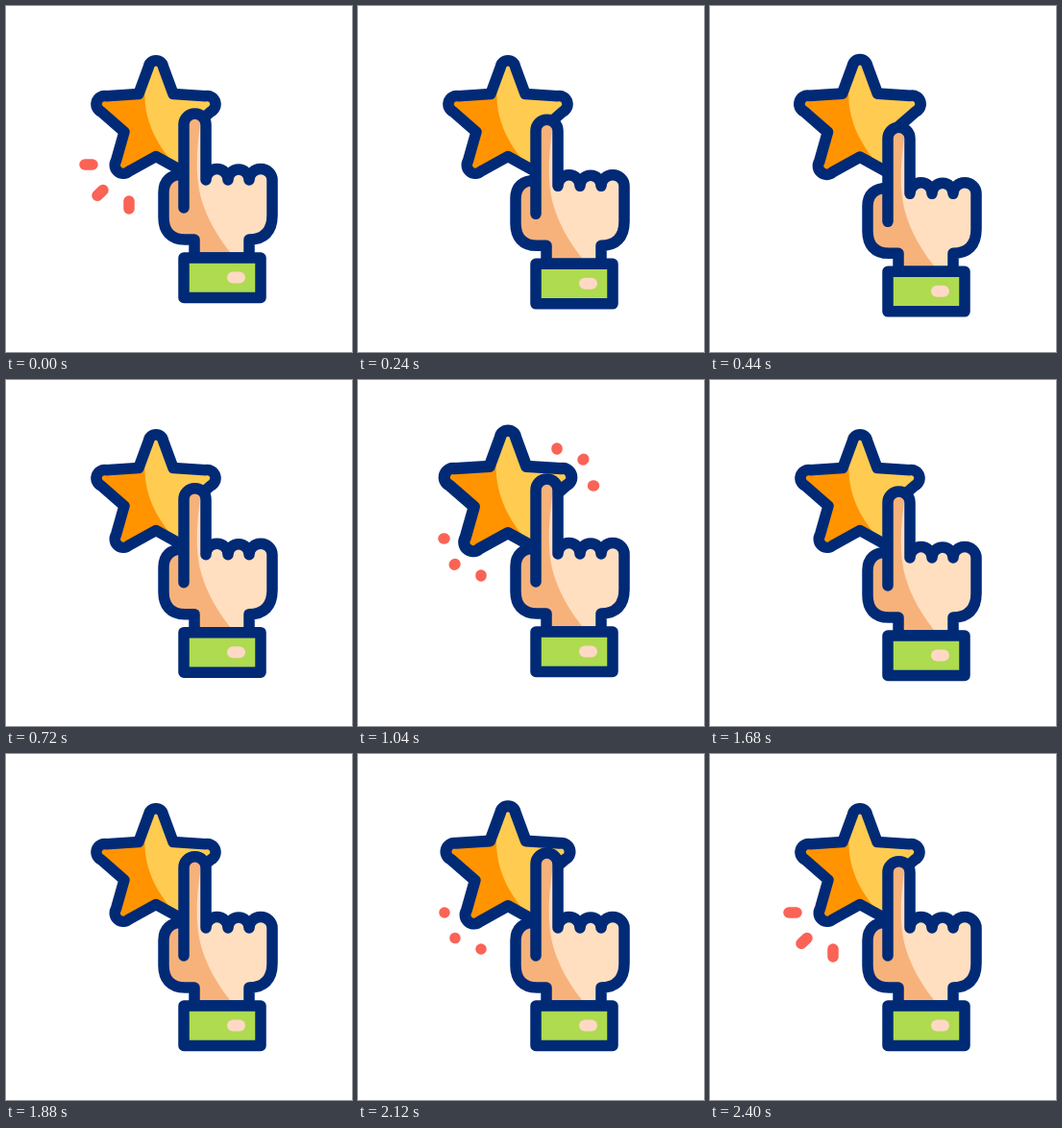
An HTML page that plays this animation: 360 by 360 pixels, repeating every 2440 ms.

```html
<!DOCTYPE html>
<html lang="en">
<head>
<meta charset="utf-8">
<title>Tap the star</title>
<style>
  html, body { margin: 0; width: 100%; height: 100%; overflow: hidden; background: #fff; }
  svg { display: block; width: 100%; height: 100%; }
  .ink { fill: none; stroke: #002a76; stroke-width: 11.5; stroke-linecap: round; stroke-linejoin: round; }
</style>
</head>
<body>
<svg viewBox="0 0 360 360">
  <defs>
    <path id="starShape" d="M148.500 63A7.600 7.600 0 0 1 163.500 63L174 91.500L208 93.700A8.600 8.600 0 0 1 213 110L189 131L197.500 161A8.800 8.800 0 0 1 184 172L156 156.500L128 172A8.800 8.800 0 0 1 114.500 161L123 131L99 110A8.600 8.600 0 0 1 104 93.700L138 91.500Z"/>
    <clipPath id="starClip"><use href="#starShape"/></clipPath>
    <clipPath id="handClip"><path class="hand"/></clipPath>
  </defs>
  <g id="star">
    <use href="#starShape" fill="#ff9300"/>
    <path clip-path="url(#starClip)" fill="#ffcb50" d="M151.500 52C138 92 141 132 184 174L235 185V45Z"/>
    <use href="#starShape" class="ink"/>
  </g>
  <g id="sparks" stroke-linecap="round"></g>
  <g id="arm">
    <path class="hand" fill="#f7b27b"/>
    <path clip-path="url(#handClip)" fill="#ffdfc0" d="M206 100C198 140 196 175 203 200C209 221 220 240 236 260V264H290V100Z"/>
    <path class="hand ink"/>
    <rect x="185" y="262" width="80" height="41.500" fill="#aedb4f"/>
    <rect x="185" y="262" width="80" height="41.500" class="ink"/>
    <rect x="230" y="276.500" width="19" height="12" rx="6" fill="#ffd8c6"/>
  </g>
</svg>
<script>
const LOOP = 2440;
const RED = '#fa6355', GOLD = '#ffb84f';
const $ = id => document.getElementById(id);
const hands = document.querySelectorAll('.hand');

const ease = u => (1 - Math.cos(Math.PI * u)) / 2;

// keys: [time, value] pairs, eased between neighbours
function track(keys, t) {
  if (t <= keys[0][0]) return keys[0][1];
  for (let i = 1; i < keys.length; i++) {
    const [t0, a] = keys[i - 1], [t1, b] = keys[i];
    if (t <= t1) return a + (b - a) * ease((t - t0) / (t1 - t0));
  }
  return keys[keys.length - 1][1];
}

const DROP = [[40, 0], [480, 14.6], [760, 0], [1120, 0], [1460, 14.6], [1500, 14.6], [1780, 0]];
const REACH = [[740, 0], [940, 9], [1060, 9], [1160, 0], [1760, 0], [1980, 9], [2120, 9], [2440, 0]];
const PULSES = [520, 1040, 1557, 2068];

// spark motion, in ms since it appears
const HEAD = [[60, 0], [330, 8]];
const TAIL = [[380, 0], [480, 7]];
const SIZE = [[0, 0], [50, 11.5], [440, 11.5], [520, 0]];
const BURSTS = [{ at: 920, both: true }, { at: 2060, both: false }];

// start point and direction
const SPARKS = [
  [90, 165, -1, 0], [101, 191.5, -0.75, 0.72], [128, 203, 0, 1],
  [207, 72, 0, -1], [234, 83, 0.75, -0.72], [244.5, 110, 1, 0]
].map(([x, y, dx, dy], i) => {
  const lines = [0, 1].map(() => {
    const line = document.createElementNS('http://www.w3.org/2000/svg', 'path');
    $('sparks').append(line);
    return line;
  });
  return { x, y, dx, dy, lines, right: i > 2 };
});

function handPath(reach) {
  return `M185 210V${123.5 - reach}a11.5 11.5 0 0 1 23 0V181` +
    'a11.5 11.5 0 0 1 23 0a11 11 0 0 1 22 0a12 11.5 0 0 1 24 0' +
    'V218C277 235 268 243 253 243V262H196V243H186' +
    'C171 243 164 234 164 220V194C164 182 171 175 185 175';
}

function drawSpark(s, t) {
  let age = -1;
  for (const b of BURSTS) {
    const a = (t - b.at + LOOP) % LOOP;
    if (a < 520 && (b.both || !s.right)) age = a;
  }
  const size = age < 0 ? 0 : track(SIZE, age);
  const head = track(HEAD, age), tail = track(TAIL, age);
  const point = d => `${s.x + s.dx * d} ${s.y + s.dy * d}`;
  const d = `M${point(tail)}L${point(head + 0.01)}`;
  const gold = age > 400;
  s.lines.forEach((line, i) => {
    line.setAttribute('d', d);
    line.setAttribute('stroke', i ? GOLD : RED);
    line.setAttribute('stroke-width', i ? Math.max(0, size - 1) : size);
    line.style.display = size > 0.1 && (!i || gold) ? '' : 'none';
  });
}

function draw(t) {
  const d = handPath(track(REACH, t));
  hands.forEach(h => h.setAttribute('d', d));
  $('arm').setAttribute('transform', `translate(0 ${track(DROP, t)})`);

  let pulse = 0;
  for (const p of PULSES) {
    const u = Math.abs(t - p) / 120;
    if (u < 1) pulse = 1 - ease(u);
  }
  const k = 1 + 0.068 * pulse;
  $('star').setAttribute('transform', `translate(156 117) scale(${k}) translate(-156 -117)`);

  SPARKS.forEach(s => drawSpark(s, t));
}

const start = performance.now();
function tick() {
  draw((performance.now() - start) % LOOP);
  requestAnimationFrame(tick);
}
tick();
</script>
</body>
</html>
```
